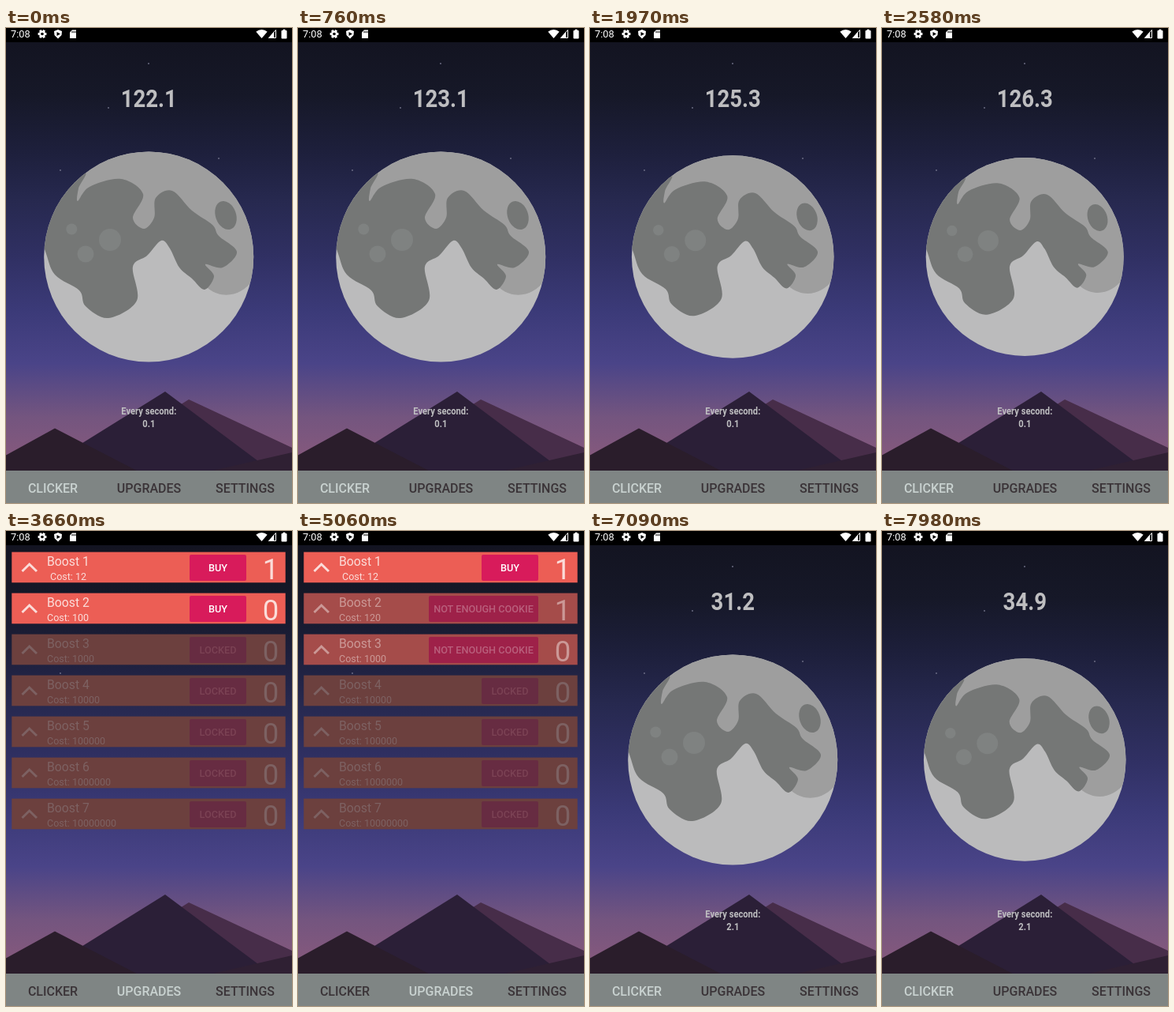
Animation of 363 by 601 pixels, one loop 8000 ms. Source, as an HTML page with a canvas:

```html
<!DOCTYPE html>
<html lang="en">
<head>
<meta charset="utf-8">
<title>Moon clicker</title>
<style>
html, body { margin: 0; width: 100%; height: 100%; overflow: hidden; background: #000; }
canvas { display: block; width: 363px; height: 601px; }
</style>
</head>
<body>
<canvas id="stage" width="363" height="601"></canvas>
<script>
const W = 363, H = 601, LOOP = 8000, GROUND = 560;
const CX = 181.2, CY = 289.5, RADIUS = 133;
const BUY_AT = 5010;
const FONT = 'Roboto, "Noto Sans", sans-serif';
const clicks = [460, 1130, 1780, 2480, 7180, 7790];

const view = document.getElementById('stage').getContext('2d');
const layer = document.createElement('canvas');
layer.width = W;
layer.height = H;
const page = layer.getContext('2d');

const ramp = (t, a, b) => Math.max(0, Math.min(1, (t - a) / (b - a)));

function text(c, str, x, y, size, color, weight = 400, align = 'left') {
  c.font = `${weight} ${size}px ${FONT}`;
  c.textAlign = align;
  c.fillStyle = color;
  c.fillText(str, x, y);
}

// Bold type in a condensed cut
function narrow(c, str, y, size) {
  c.save();
  c.translate(181.3, y);
  c.scale(0.86, 1);
  text(c, str, 0, 0, size, '#bebec0', 700, 'center');
  c.restore();
}

function poly(c, color, ...pts) {
  c.fillStyle = color;
  c.beginPath();
  pts.forEach(p => c.lineTo(...p));
  c.fill();
}

function dot(c, x, y, r, color) {
  c.fillStyle = color;
  c.beginPath();
  c.arc(x, y, r, 0, Math.PI * 2);
  c.fill();
}

function box(c, x, y, w, h, r, color) {
  c.fillStyle = color;
  c.beginPath();
  c.roundRect(x, y, w, h, r);
  c.fill();
}

// Closed Catmull-Rom curve through the points
function smooth(c, color, pts) {
  const n = pts.length, at = i => pts[(i + n) % n];
  c.fillStyle = color;
  c.beginPath();
  c.moveTo(...pts[0]);
  pts.forEach((b, i) => {
    const a = at(i - 1), d = at(i + 1), e = at(i + 2);
    c.bezierCurveTo(b[0] + (d[0] - a[0]) / 6, b[1] + (d[1] - a[1]) / 6,
      d[0] - (e[0] - b[0]) / 6, d[1] - (e[1] - b[1]) / 6, ...d);
  });
  c.fill();
}

// Key points of the dark plain, clockwise from the top left rim
const mare = ('98,184 92,203 91,219 106,201 146,191 174,210 161,240 175,254 188,240 190,215 ' +
  '211,206 236,231 262,249 270,263 293,283 275,303 253,299 264,314 252,331 236,317 ' +
  '220,303 208,279 197,269 179,288 161,302 166,345 130,367 101,352 93,332 62,312 49,280 30,230')
  .split(' ').map(p => p.split(',').map(Number));

const sky = view.createLinearGradient(0, 18, 0, GROUND);
['#131421', '#161828', '#1d1f3b', '#272950', '#303063', '#3b3a78', '#4a4488', '#74557f', '#8a5a7c']
  .forEach((color, i, all) => sky.addColorStop(i / (all.length - 1), color));

// A peak with straight sides running down to the ground
function hill(c, x, y, left, right, color) {
  const h = GROUND - y;
  poly(c, color, [x, y], [x + h / right, GROUND], [x - h / left, GROUND]);
}

function scenery(c) {
  c.fillStyle = sky;
  c.fillRect(0, 18, W, GROUND - 18);
  [[181, 45], [130, 101], [270, 165], [69, 180]].forEach(p => dot(c, ...p, 0.9, '#73748b'));
  hill(c, 232, 470, 0.62, 0.466, '#472d49');
  hill(c, 202, 460, 0.62, 0.745, '#2b1f37');
  hill(c, 62, 506.5, 0.55, 0.515, '#2a1d2b');
  hill(c, 363, 537, 0.228, 1, '#2f2033');
}

function statusBar(c) {
  const white = '#fff', black = '#000';
  c.fillStyle = black;
  c.fillRect(0, 0, W, 18);
  text(c, '7:08', 6, 12, 12.8, white);
  // Gear
  for (let i = 0; i < 3; i++) {
    c.save();
    c.translate(46, 7.5);
    c.rotate(i * Math.PI / 3);
    c.fillRect(-5.4, -1.5, 10.8, 3);
    c.restore();
  }
  dot(c, 46, 7.5, 4, white);
  dot(c, 46, 7.5, 1.8, black);
  // Shield
  poly(c, white, [66, 2], [71, 4], [70.5, 9], [66, 13.5], [61.5, 9], [61, 4]);
  poly(c, black, [64.5, 5], [69, 7.5], [64.5, 10]);
  // Memory card
  poly(c, white, [84, 2.5], [89, 2.5], [89, 13], [81, 13], [81, 5.5]);
  c.fillStyle = black;
  for (let x = 83.5; x < 89; x += 2) c.fillRect(x, 4, 1, 2.2);
  // Wireless, signal, battery
  c.fillStyle = c.strokeStyle = white;
  c.beginPath();
  c.moveTo(324.5, 13);
  c.arc(324.5, 13, 11, -2.28, -0.86);
  c.fill();
  c.lineWidth = 1;
  c.beginPath();
  c.moveTo(342.5, 2.5);
  c.lineTo(342.5, 12.5);
  c.lineTo(333.5, 12.5);
  c.closePath();
  c.stroke();
  poly(c, white, [340, 5], [340, 13], [333, 13]);
  box(c, 349.5, 3, 7, 10.5, 1, white);
  c.fillRect(351.5, 1.7, 3, 2);
}

function navBar(c, active) {
  c.fillStyle = '#7f8584';
  c.fillRect(0, GROUND, W, H - GROUND);
  ['CLICKER', 'UPGRADES', 'SETTINGS'].forEach((name, i) =>
    text(c, name, 59.5 + 122 * i, 588, 16, i === active ? '#c9d2d0' : '#3a3337', 500, 'center'));
}

function moon(c, scale) {
  c.save();
  c.translate(CX, CY);
  c.scale(scale, scale);
  c.translate(-CX, -CY);
  dot(c, CX, CY, RADIUS, '#bbbbbc');
  c.clip();
  // Upper highland, its lower edge mostly hidden by the dark plain
  c.fillStyle = '#9e9e9e';
  c.beginPath();
  c.moveTo(60, 250);
  c.lineTo(60, 150);
  c.lineTo(330, 150);
  c.lineTo(313, 319);
  c.bezierCurveTo(300, 338, 276, 344, 257, 330);
  c.lineTo(212, 270);
  c.lineTo(180, 262);
  c.fill();
  smooth(c, '#757776', mare);
  c.beginPath();
  c.ellipse(279, 237, 13, 18.5, -0.35, 0, Math.PI * 2);
  c.fill();
  [[132, 268, 14], [101, 286, 10.5], [83.3, 254.5, 7]].forEach(p => dot(c, ...p, '#7f8281'));
  c.restore();
}

function balance(t) {
  const made = clicks.filter(k => k <= t).length;
  return t < BUY_AT
    ? 122.1 + made + 0.1 * Math.floor((t + 70) / 1010)
    : 27.2 + made + 0.21 * Math.floor((t - 7090) / 100);
}

// Each tap squeezes the moon by 6 % and lets it go within 300 ms
function moonScale(t) {
  const p = clicks.map(k => (t - k + 25) / 300).find(x => x >= 0 && x < 1) || 0;
  return 1 - 0.03 * (1 - Math.cos(p * Math.PI * 2));
}

function clicker(c, t) {
  moon(c, moonScale(t));
  narrow(c, balance(t).toFixed(1), 99.7, 32);
  narrow(c, 'Every second:', 489, 13);
  narrow(c, t < BUY_AT ? '0.1' : '2.1', 505, 13);
}

const looks = {
  open: { row: '#ec5e55', ink: '#fbdcd9', btn: '#d81b5b', label: '#fff', word: 'BUY' },
  poor: { row: '#a54c4a', ink: '#cb9896', btn: '#9e2149', label: '#b95f7c', word: 'NOT ENOUGH COOKIE' },
  locked: { row: '#6c403e', ink: '#7d6162', btn: '#672c42', label: '#7b4254', word: 'LOCKED' }
};

function boost(c, i, look, cost, count) {
  const y = 27 + 52 * i, { row, ink, btn, label, word } = look;
  const w = look === looks.poor ? 139 : 72;
  c.fillStyle = row;
  c.fillRect(7.3, y - 0.4, 347.4, 38.7);
  c.strokeStyle = ink;
  c.lineWidth = 3;
  c.beginPath();
  c.moveTo(20.5, y + 24);
  c.lineTo(29.7, y + 15);
  c.lineTo(39, y + 24);
  c.stroke();
  text(c, 'Boost ' + (i + 1), 52, y + 17, 15.8, ink);
  text(c, 'Cost: ' + cost, i ? 52 : 56, y + 35, 12.5, ink);
  box(c, 305 - w, y + 3, w, 33, 2, btn);
  text(c, word, 305 - w / 2, y + 24, 12.7, label, 500, 'center');
  text(c, count, 336, y + 34, 36.5, ink, 400, 'center');
}

function upgrades(c, t) {
  const bought = t >= BUY_AT, { open, poor, locked } = looks;
  boost(c, 0, open, 12, 1);
  boost(c, 1, bought ? poor : open, bought ? 120 : 100, bought ? 1 : 0);
  for (let i = 2; i < 7; i++) boost(c, i, bought && i === 2 ? poor : locked, 10 ** (i + 1), 0);
}

function fade(draw, t, alpha) {
  if (alpha <= 0) return;
  page.clearRect(0, 0, W, H);
  draw(page, t);
  view.globalAlpha = alpha;
  view.drawImage(layer, 0, 0);
  view.globalAlpha = 1;
}

function frame(now) {
  const t = now % LOOP;
  const shop = ramp(t, 3500, 3660) - ramp(t, 6470, 6810);
  scenery(view);
  fade(clicker, t, 1 - shop);
  fade(upgrades, t, shop);
  statusBar(view);
  navBar(view, t >= 3520 && t < 6490 ? 1 : 0);
  requestAnimationFrame(frame);
}
requestAnimationFrame(frame);
</script>
</body>
</html>
```
